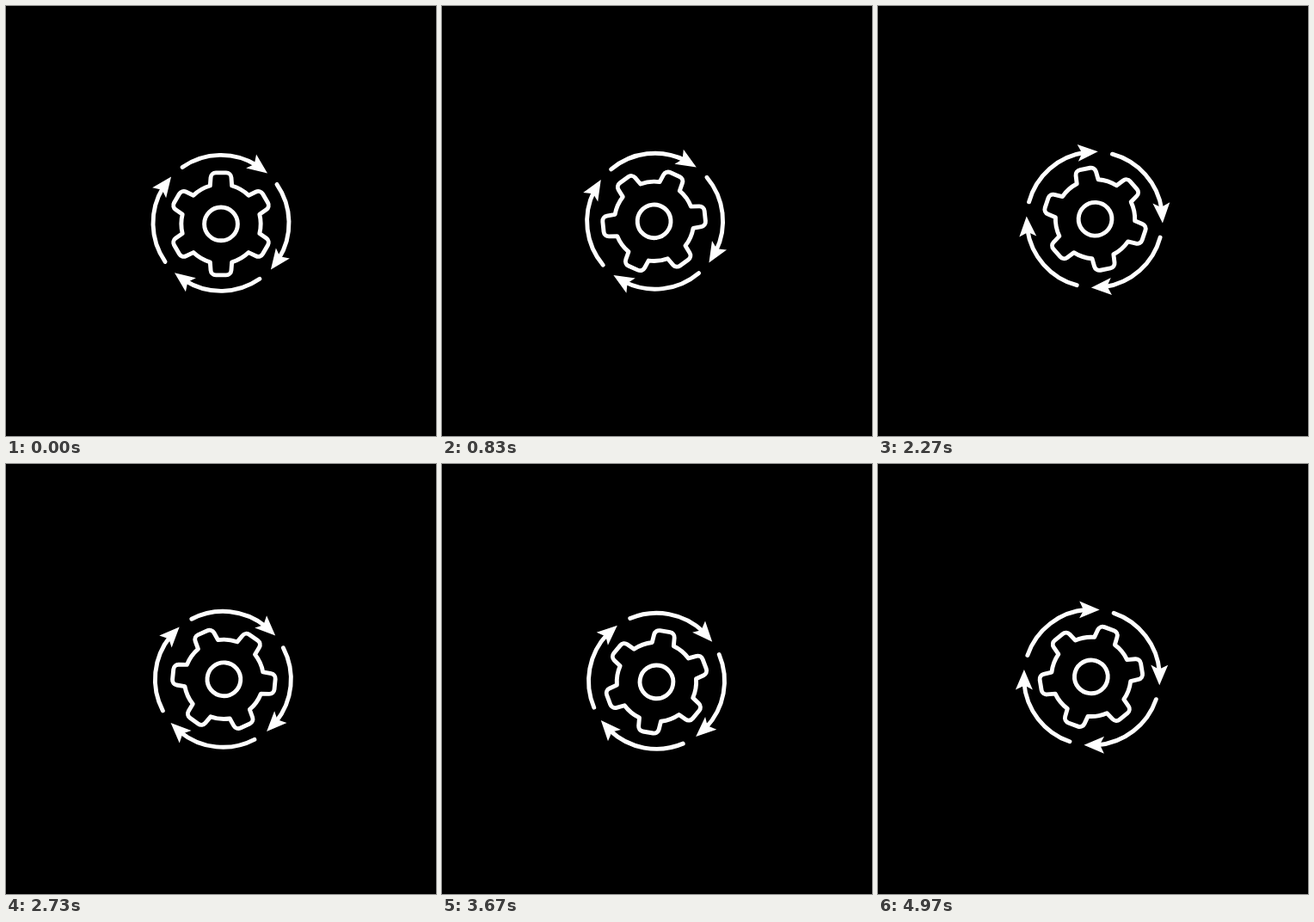
These frames come from a looping animation (500 by 500 pixels, 5.01 s). An HTML page with a canvas:

```html
<!DOCTYPE html>
<html lang="en">
<head>
<meta charset="utf-8">
<title>Rotating gear</title>
<style>
  html, body { margin: 0; width: 100%; height: 100%; overflow: hidden; background: #000; }
  canvas { display: block; }
</style>
</head>
<body>
<canvas id="stage" width="500" height="500"></canvas>
<script>
const ctx = document.getElementById('stage').getContext('2d');
const LOOP = 5010, FRAMES = 150;          // ms, count
const RING_STEP = 3.38, GEAR_STEP = 3.36; // degrees per frame
const rad = deg => deg * Math.PI / 180;

function drawArrow() {
  ctx.beginPath();
  ctx.arc(0, 0, 79, rad(-124.7), rad(-58));
  ctx.stroke();
  ctx.beginPath();
  // tip, outer wing, notch, inner wing as [radius, angle]
  for (const [r, a] of [[79.2, -47], [89.8, -62.8], [78.7, -60.5], [70.2, -65.5]]) {
    ctx.lineTo(r * Math.cos(rad(a)), r * Math.sin(rad(a)));
  }
  ctx.fill();
}

function drawRing() {
  for (let i = 0; i < 4; i++) {
    drawArrow();
    ctx.rotate(rad(90));
  }
}

function drawGear() {
  const baseX = 12.7, baseY = -44.4, top = -59.5;
  const body = Math.hypot(baseX, baseY), half = Math.atan2(baseX, -baseY);
  ctx.beginPath();
  for (let i = 0; i < 6; i++) {
    ctx.lineTo(-baseX, baseY);
    ctx.arcTo(-11.5, top, 0, top, 6);
    ctx.arcTo(11.5, top, baseX, baseY, 6);
    ctx.lineTo(baseX, baseY);
    ctx.arc(0, 0, body, rad(-90) + half, rad(-30) - half);
    ctx.rotate(rad(60));
  }
  ctx.closePath();
  ctx.stroke();
  ctx.beginPath();
  ctx.arc(0, 0, 19.4, 0, rad(360));
  ctx.stroke();
}

// Each part sits slightly off the pivot, so it wobbles as it turns
function spin(angle, offset, drawPart) {
  ctx.save();
  ctx.translate(250, 250);
  ctx.rotate(rad(angle));
  ctx.translate(0, offset);
  drawPart();
  ctx.restore();
}

function draw(now) {
  // 30 frames per second, with frame starts on 10 ms ticks
  const tick = Math.floor((now % LOOP) / 10);
  const frame = Math.min(FRAMES - 1, Math.floor(tick * 0.3 + 0.15));

  ctx.fillStyle = '#000';
  ctx.fillRect(0, 0, 500, 500);
  ctx.fillStyle = ctx.strokeStyle = '#fff';
  ctx.lineWidth = 4.9;
  ctx.lineCap = ctx.lineJoin = 'round';

  spin(frame * RING_STEP, 2.4, drawRing);
  spin(frame * GEAR_STEP, 3.4, drawGear);
}

const start = performance.now();
function loop() {
  draw(performance.now() - start);
  requestAnimationFrame(loop);
}
loop();
</script>
</body>
</html>
```
